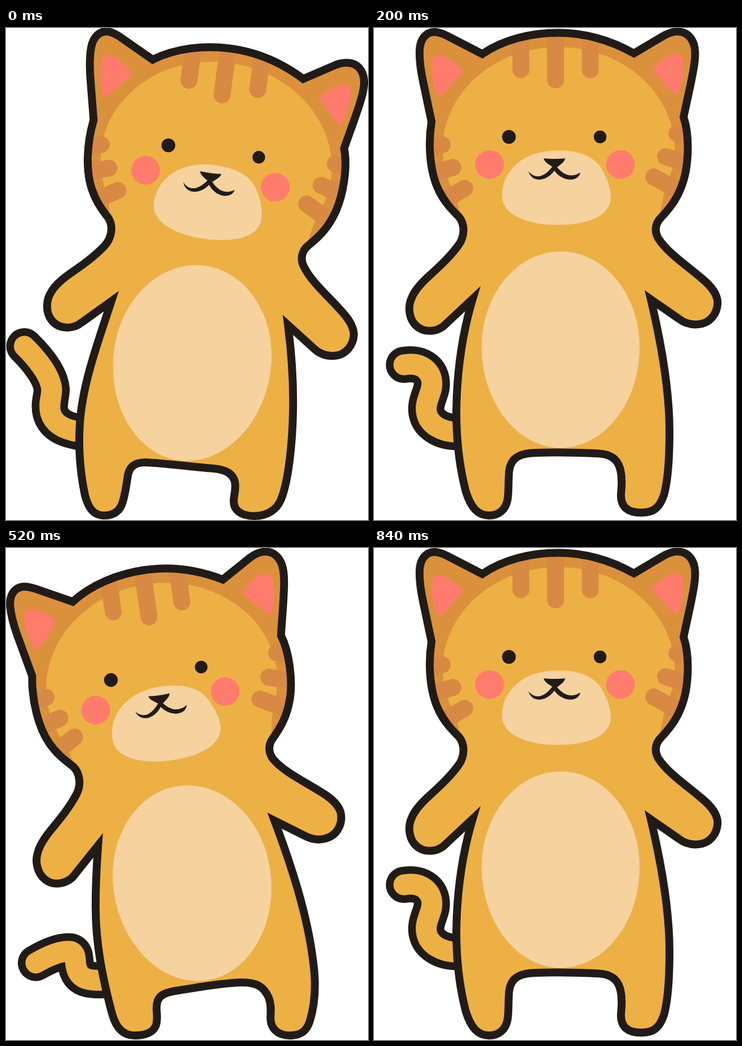
Write an HTML page that moves like this. It is 642x872 px and loops after 1 s.

```html
<!DOCTYPE html>
<html lang="en">
<head>
<meta charset="utf-8">
<title>Dancing cat</title>
<style>
  html, body { margin: 0; width: 100%; height: 100%; overflow: hidden; background: #fff; }
  svg { display: block; width: 642px; height: 872px; }

  .fur { fill: #edb045; }
  .shade { fill: #db913c; }
  .cream { fill: #f6d29f; }
  .pink { fill: #ff7c6c; }
  .ink { fill: #211b18; }
  .stripes { fill: none; stroke: #d88943; stroke-width: 30; stroke-linecap: round; }
  .outline { fill: none; stroke: #211b18; stroke-width: 14; stroke-miterlimit: 10; }
  .tail { fill: none; stroke-linecap: round; stroke-linejoin: round; }
  .tail.rim { stroke: #211b18; stroke-width: 64; }
  .tail.core { stroke: #edb045; stroke-width: 37; }

  .pose { visibility: hidden; animation: 1s step-end infinite; }
  .right { animation-name: right; }
  .upright { animation-name: upright; }
  .left { animation-name: left; }
  @keyframes right { 0% { visibility: visible } 20%, 100% { visibility: hidden } }
  @keyframes upright {
    0%, 40% { visibility: hidden }
    20%, 60%, 100% { visibility: visible }
  }
  @keyframes left { 0%, 60%, 100% { visibility: hidden } 40% { visibility: visible } }
</style>
</head>
<body>
<svg id="stage" viewBox="0 0 642 872">
  <defs>
    <clipPath id="torso"><path id="torsoShape"/></clipPath>
    <path id="ear" d="M103 60C104 49 114 46 124 50C138 56 150 66 156 74C158 77 157 80 154 82C144 93 133 106 121 118C117 121 113 121 111 116C104 98 101 78 103 60Z"/>
    <g id="cat">
      <g clip-path="url(#torso)">
        <rect class="shade" x="60" width="530" height="338"/>
        <path class="fur" d="M155 345C152 322 148 306 140 288C128 265 122 240 122 215C122 115 213 34 327 34C441 34 533 115 533 215C533 245 524 265 515 290C511 308 508 322 504 345Z"/>
        <path class="stripes" d="M260.500 0V74M322 0V92M383.500 0V74
          M94 213L121 207M103 259L140 247M122 307L161 284
          M562 192L537 187M552 239L517 228M537 286L496 264"/>
      </g>
      <use href="#ear" class="pink"/>
      <use href="#ear" class="pink" transform="translate(651 -3) scale(-1 1)"/>
      <path class="cream" d="M325 217C365 217 392 228 405 252C414 268 420 285 420 301C419 333 380 349 325 349C275 349 227 332 227 298C227 250 268 217 325 217Z"/>
      <path class="cream" d="M331 396C408 396 471 472 471 565C471 664 408 744 331 744C254 744 191 664 191 565C191 472 254 396 331 396Z"/>
      <g class="pink">
        <circle cx="205" cy="242" r="25.500"/>
        <circle cx="437" cy="242" r="25.500"/>
      </g>
      <g class="ink">
        <circle cx="239.300" cy="193" r="12.200"/>
        <circle cx="401" cy="193" r="11.200"/>
        <path d="M301 231Q320 233 339 231C338 238 329 243 321 250C314 243 302 239 301 231Z"/>
        <path d="M274 254C284 267 300 267 316 246L323 248C308 274 280 275 274 254Z"/>
        <path d="M366 256C352 265 338 263 324 246L317 248C330 273 362 275 366 256Z"/>
      </g>
    </g>
  </defs>
</svg>
<script>
  // Left armpit, arm, neck, ears, head, right arm, right armpit: rigid in every pose.
  const torso = "M175 480L128 524C113 540 88 541 74 527C61 514 60 492 67 478C72 465 83 453 96 441" +
    "C118 421 135 405 149 386C162 369 161 348 151 335C135 319 125 308 115 288C100 258 95 210 102 166" +
    "L86 90C82 70 80 55 81 38C82 20 92 7 107 7C115 7 122 10 130 14L192 46" +
    "C230 20 280 8.5 326 8.5C375 8.5 420 22 461 45L515 13C530 5 545 4 556 12C566 20 571 35 569 55" +
    "C568 75 560 105 549 158C560 190 558 240 549 270C540 300 526 318 509 336" +
    "C498 347 497 362 505 374C520 397 548 416 578 441C593 453 606 466 609 482" +
    "C611 500 601 519 582 524C566 528 552 524 540 515L491 481";

  // x, y: point between the eyes; legs run from the right armpit back up to the left one.
  const poses = [
    { name: "right", x: 368, y: 218.5, turn: 7.48,
      tail: "M32.5 564C53 584 79 615 81 640C81 655 75 665 79 682C85 703 104 712 130 716",
      legs: "C507 580 510 630 509 680C508 730 502 800 488 835C480 855 462 865 440 865" +
        "C415 865 402 853 404 835C405 825 408 817 406 805C403 790 390 783 370 781" +
        "C330 778 290 772 250 770C228 769 217 777 215 800C213 815 211 826 207 840" +
        "C202 857 190 865 172 864C155 863 146 851 140 828C132 790 128 745 131 700C136 630 162 560" },
    { name: "upright", x: 320, y: 193, turn: 0,
      tail: "M53 597C85 591 107 610 102 638C98 655 89 668 94 685C99 703 120 716 146 716",
      legs: "C505 540 524 630 524 715C524 760 522 800 514 828C506 852 494 859 474 859" +
        "C450 859 438 849 438 828C438 820 440 812 439 800C438 768 425 755 395 754" +
        "C350 752 310 752 285 753C250 754 239 768 239 795C238 815 239 820 237 835" +
        "C234 853 222 864 204 864C184 864 172 850 163 822C152 780 146 730 146 680C147 600 160 530" },
    { name: "left", x: 266, y: 222.5, turn: -8.18,
      tail: "M53 735.5C76 722 100 713 115 715C127 719 120 735 127 750C133 763 145 767 172 766",
      legs: "C505 560 535 650 545 735C551 780 546 815 539 838C533 857 522 864 503 864" +
        "C482 864 469 852 469 832C470 818 470 808 466 797C457 777 444 769 415 770" +
        "C370 772 330 781 300 785C275 789 267 797 267 815C267 825 269 830 267 842" +
        "C264 858 248 864 228 864C208 864 195 851 188 825C172 765 158 700 159 630C159 590 161 560" }
  ];

  const pivot = { x: 320, y: 193 };

  function place(path, { x, y, turn }) {
    const a = turn * Math.PI / 180, cos = Math.cos(a), sin = Math.sin(a);
    return path.replace(/([\d.]+) ([\d.]+)/g, (_, px, py) => {
      const dx = px - pivot.x, dy = py - pivot.y;
      return (x + dx * cos - dy * sin).toFixed(2) + " " + (y + dx * sin + dy * cos).toFixed(2);
    });
  }

  function draw(pose) {
    const upper = place(torso, pose);
    const start = upper.slice(1, upper.indexOf("L"));
    const body = `${upper}${pose.legs} ${start}Z`;
    const move = `translate(${pose.x} ${pose.y}) rotate(${pose.turn}) translate(${-pivot.x} ${-pivot.y})`;
    return `<g class="pose ${pose.name}">
      <path class="tail rim" d="${pose.tail}"/>
      <path class="tail core" d="${pose.tail}"/>
      <path class="fur" d="${body}"/>
      <use href="#cat" transform="${move}"/>
      <path class="outline" d="${body}"/>
    </g>`;
  }

  document.getElementById("torsoShape").setAttribute("d", torso + "Z");
  document.getElementById("stage").insertAdjacentHTML("beforeend", poses.map(draw).join(""));
</script>
</body>
</html>
```
